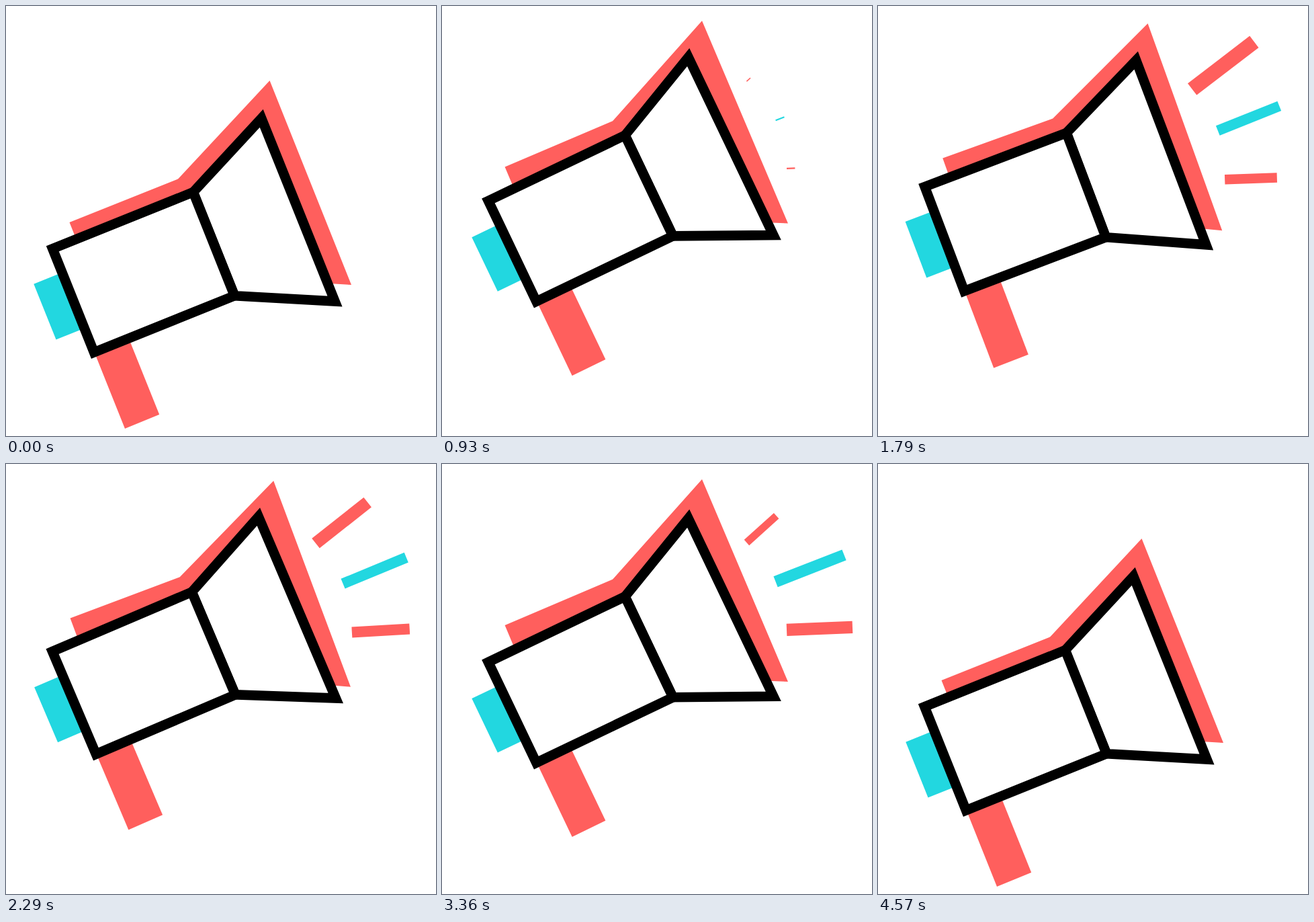
Write an HTML page that moves like this. It is 640x640 px and loops after 4780 ms.

```html
<!DOCTYPE html>
<html lang="en">
<head>
<meta charset="utf-8">
<title>Megaphone</title>
<style>
  html, body { margin: 0; width: 100%; height: 100%; overflow: hidden; background: #fff; }
  svg { display: block; width: 100%; height: 100%; }
  .red { fill: #ff5f5d; }
  .cyan { fill: #22d7e0; }
  .outline { fill: #fff; stroke: #000; stroke-width: 14.6; stroke-miterlimit: 10; }
</style>
</head>
<body>
<svg viewBox="0 0 640 640">
  <polygon id="shadow" class="red" points="94.5,322 256.2,257.3 392.5,111 514,415 330,404 153,470"/>
  <g id="horn">
    <polygon class="red" points="121,489 172,468 228.2,608 177,629"/>
    <polygon class="cyan" points="41.3,413.8 87.7,395.1 120.9,477.9 74.5,496.6"/>
    <polygon class="outline" points="278.6,277.1 380.2,167.2 489.5,439.6 340.1,431.3"/>
    <polygon class="outline" points="69.3,361.3 278.6,277.1 340.1,431.3 131,515.4"/>
    <rect class="red"/>
    <rect class="cyan"/>
    <rect class="red"/>
  </g>
</svg>
<script>
const LOOP = 4780;
const STEP = 500 / 7;
const LAST_STEP = 64;
const LIFT = 87.5;

// Each wave is [centre, cosine part, sine part].
const shadow = {
  el: document.getElementById('shadow'), pivot: [325, 368],
  rise: 3.5, fall: 82, lean: 1.39, shake: [0, 1.27, 1.7]
};
const horn = {
  el: document.getElementById('horn'), pivot: [320, 375.5],
  rise: 0, fall: 80, lean: 2.97, shake: [0, -1.2, 3.5]
};
const rays = [
  { x: 464.5, y: 208.6, ratio: 0.188, angle: [40.4, 3.2, -1.2], length: [88, -10.5, -33.4] },
  { x: 503.8, y: 269.5, ratio: 0.156, angle: [20.3, -1, -3.1], length: [104, 2, 6.4] },
  { x: 515.6, y: 342, ratio: 0.187, angle: [0.1, -2, -2.2], length: [84.5, -1.5, 13.7] }
];
const rayEls = horn.el.querySelectorAll('rect');

const progress = (tick, start, length) => Math.min(1, Math.max(0, (tick - start) / length));
const smooth = x => x * x * (3 - 2 * x);

function wave([centre, c, s], tick) {
  const phase = 2 * Math.PI * 0.3 * (tick - 2);
  return centre + c * Math.cos(phase) + s * Math.sin(phase);
}

function place(part, tick) {
  const up = progress(tick, part.rise, 18);
  const down = progress(tick, part.fall, 21);
  const lift = LIFT * (smooth(up) - smooth(down));
  const shaking = tick >= 16 && tick <= 84;
  const turn = shaking
    ? wave(part.shake, tick)
    : part.lean * (Math.sin(Math.PI * up) + Math.sin(Math.PI * down));
  part.el.setAttribute('transform',
    `translate(0 ${-lift}) rotate(${-turn} ${part.pivot})`);
}

function placeRay(ray, el, tick) {
  const scale = smooth(progress(tick, 21, 9)) - smooth(progress(tick, 84, 7));
  const length = Math.max(0, wave(ray.length, tick) * scale);
  const width = length * ray.ratio;
  el.setAttribute('y', -width / 2);
  el.setAttribute('width', length);
  el.setAttribute('height', width);
  el.setAttribute('transform',
    `translate(${ray.x} ${ray.y}) rotate(${-wave(ray.angle, tick)})`);
}

function draw(time) {
  const step = Math.min(LAST_STEP, Math.floor((time % LOOP + 5) / STEP));
  const tick = Math.floor(step * 25 / 14);
  place(shadow, tick);
  place(horn, tick);
  rays.forEach((ray, i) => placeRay(ray, rayEls[i], tick));
}

const begin = performance.now();
function loop() {
  draw(performance.now() - begin);
  requestAnimationFrame(loop);
}
loop();
</script>
</body>
</html>
```
